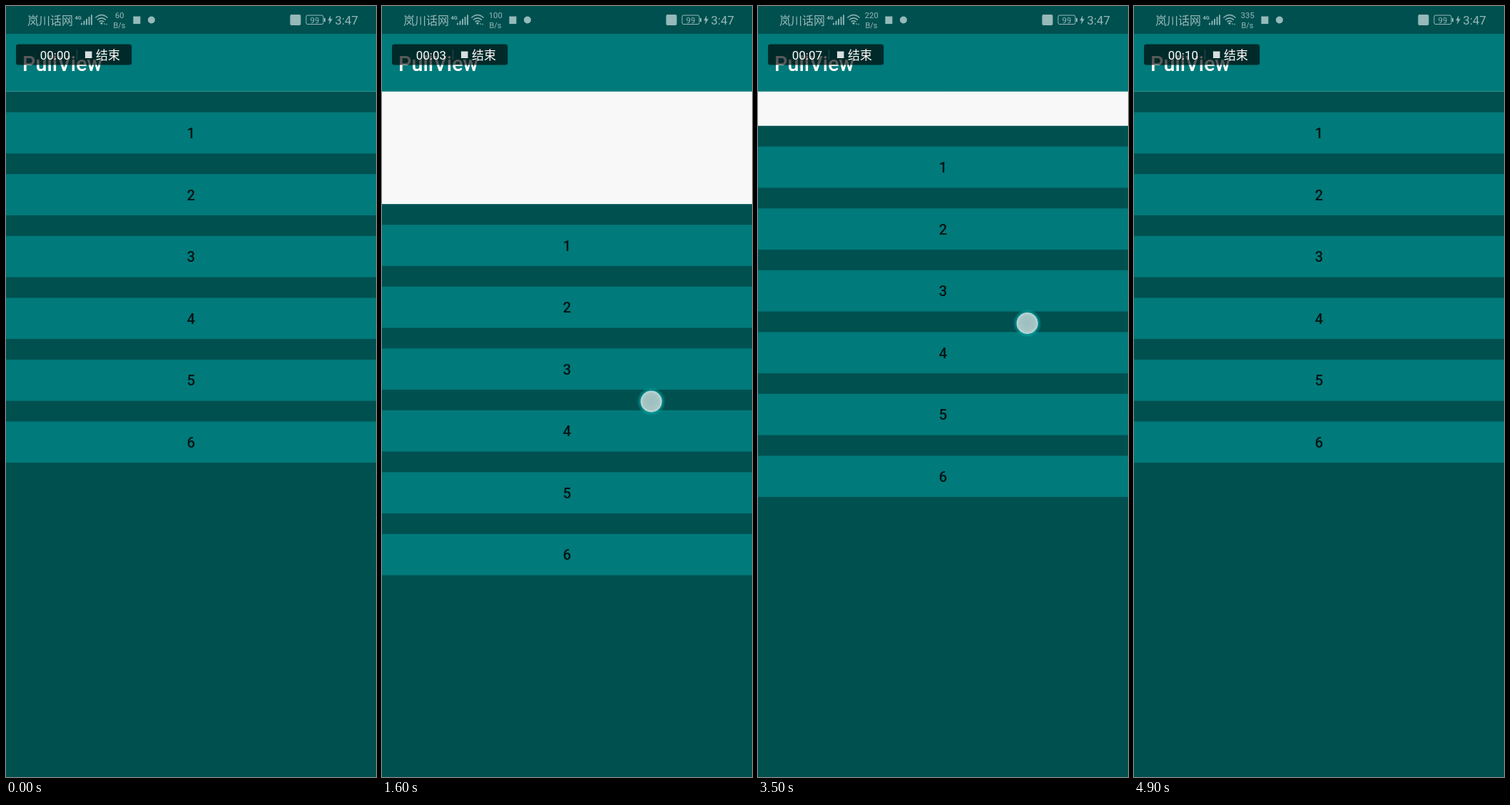
Write an HTML page that moves like this. It is 519 by 1079 pixels and loops after 5000 ms.

```html
<!DOCTYPE html>
<html lang="zh-CN">
<head>
<meta charset="utf-8">
<title>PullView</title>
<style>
  html, body { margin: 0; width: 100%; height: 100%; overflow: hidden; background: #005050; }
  svg { display: block; width: 100vw; height: 100vh; }
  text { font-family: Roboto, "Noto Sans CJK SC", "Noto Sans CJK", sans-serif; }
  .mid { text-anchor: middle; }
  .row text { font-size: 20.2px; font-weight: 500; fill: #001414; }
  .status { fill: #96b9b9; }
  .line { fill: none; stroke: #96b9b9; }
</style>
</head>
<body>
<svg viewBox="0 0 519 1079" preserveAspectRatio="none">
  <defs>
    <radialGradient id="skin">
      <stop offset="0" stop-color="#9dbfbf"/>
      <stop offset=".75" stop-color="#a6c5c5"/>
      <stop offset="1" stop-color="#c3d8d8"/>
    </radialGradient>
    <radialGradient id="glow">
      <stop offset=".7" stop-color="#00a5a5" stop-opacity=".9"/>
      <stop offset="1" stop-color="#00a5a5" stop-opacity="0"/>
    </radialGradient>
  </defs>

  <rect y="119" width="519" height="960" fill="#f8f8f9"/>
  <g id="list"><rect y="119.7" width="519" height="960" fill="#005050"/></g>

  <rect width="519" height="39.2" fill="#005050"/>
  <rect y="39" width="519" height="80.7" fill="#007a7a"/>
  <text x="23" y="90.5" font-size="28.8" font-weight="500" fill="#fff">PullView</text>

  <g class="status">
    <text x="30" y="26" font-size="16">岚川话网</text>
    <text x="96.5" y="19" font-size="7.5" font-weight="700">4G</text>
    <g id="bars"></g>
    <g class="line" stroke-width="1.5">
      <path d="M125.5 16.5Q134 8.500 142.500 16.500M128 19.500Q134 14 140 19.500M130.500 22.300Q134 19.300 137.500 22.300"/>
    </g>
    <path d="M132 24l2 -1.500 2 1.500 -2 2.300zM137 24.500h2.200l-1.100 2zM140 26.300h2.200l-1.100 -2z"/>
    <text id="speed" class="mid" x="159.300" y="16.500" font-size="11.300"></text>
    <text class="mid" x="159" y="31" font-size="11">B/s</text>
    <rect x="178.500" y="14.500" width="10" height="10.500"/>
    <circle cx="204" cy="19.500" r="5"/>
    <rect x="398.500" y="12" width="15" height="15" rx="2"/>
    <rect class="line" x="421" y="13" width="24" height="12.500" rx="2"/>
    <path d="M446 17h2v5h-2zM455.500 13l-4 7.200h2.500l-1.200 5.800 5 -7.800h-2.800z"/>
    <text class="mid" x="433" y="23.500" font-size="11.500">99</text>
    <text x="461.500" y="25.700" font-size="16.800">3:47</text>
  </g>

  <rect x="14" y="53.500" width="162.300" height="29" rx="3" fill="#000" fill-opacity=".65"/>
  <circle id="rec" cx="36" cy="68.300" r="6" fill="#ff5722"/>
  <g fill="#fff">
    <text id="clock" x="47.700" y="74.600" font-size="17"></text>
    <path d="M99 61h1v14h-1z" fill-opacity=".16"/>
    <rect x="111" y="63.500" width="9.500" height="9.500" fill-opacity=".85"/>
    <text x="126" y="74.800" font-size="17">结束</text>
  </g>

  <g id="touch">
    <circle r="20" fill="url(#glow)"/>
    <circle r="15" fill="url(#skin)"/>
  </g>
</svg>
<script>
  const LOOP = 5000, STEP = 100, RETURN = 200;
  const $ = id => document.getElementById(id);

  // start, release, height, bend of the drag curve
  const pulls = [
    [0, 904, 325, 1.04],
    [1200, 1900, 371, -0.6],
    [2150, 2500, 100, 0],
    [2800, 3000, 134, 0],
    [3400, 3600, 200, -1.04],
    [3950, 4210, 269, 0]
  ];
  const speeds = [[4600, 335], [3100, 220], [1600, 100], [0, 60]];

  function add(parent, tag, attrs, text = '') {
    const el = document.createElementNS('http://www.w3.org/2000/svg', tag);
    for (const key in attrs) el.setAttribute(key, attrs[key]);
    el.textContent = text;
    return parent.appendChild(el);
  }

  for (let i = 0; i < 6; i++) {
    const row = add($('list'), 'g', { class: 'row', transform: `translate(0 ${148.7 + i * 86.54})` });
    add(row, 'rect', { width: 519, height: 57.7, fill: '#007a7a' });
    add(row, 'text', { class: 'mid', x: 259.5, y: 36.4 }, i + 1);
  }
  for (let i = 0; i < 5; i++) {
    const h = 3 + i * 2.8;
    add($('bars'), 'rect', { x: 105.2 + i * 3.5, y: 26.5 - h, width: 1.8, height: h });
  }

  function pullAt(t) {
    for (const [start, release, height, bend] of pulls) {
      if (t > start && t <= release) {
        const p = (t - start) / (release - start);
        return { y: height * (p + bend * p * (1 - p)), held: true };
      }
      if (t > release && t < release + RETURN) {
        const p = (t - release) / RETURN;
        return { y: height * (1 + Math.cos(Math.PI * p)) / 2, held: false };
      }
    }
    return { y: 0, held: false };
  }

  function draw(t) {
    const { y, held } = pullAt(t);
    $('list').setAttribute('transform', `translate(0 ${y.toFixed(2)})`);
    $('touch').setAttribute('transform', `translate(377.7 ${(396 + y).toFixed(2)})`);
    $('touch').style.display = held ? '' : 'none';

    // the recorder's clock runs at double speed
    const ms = t * 2 + 200;
    $('clock').textContent = '00:' + String(Math.floor(ms / 1000)).padStart(2, '0');
    $('rec').style.display = ms % 1000 >= 500 ? '' : 'none';
    $('speed').textContent = speeds.find(s => t >= s[0])[1];
  }

  const origin = performance.now();
  function tick(now) {
    const t = Math.max(0, now - origin) % LOOP;
    draw(Math.floor(t / STEP) * STEP);
    requestAnimationFrame(tick);
  }
  draw(0);
  requestAnimationFrame(tick);
</script>
</body>
</html>
```
